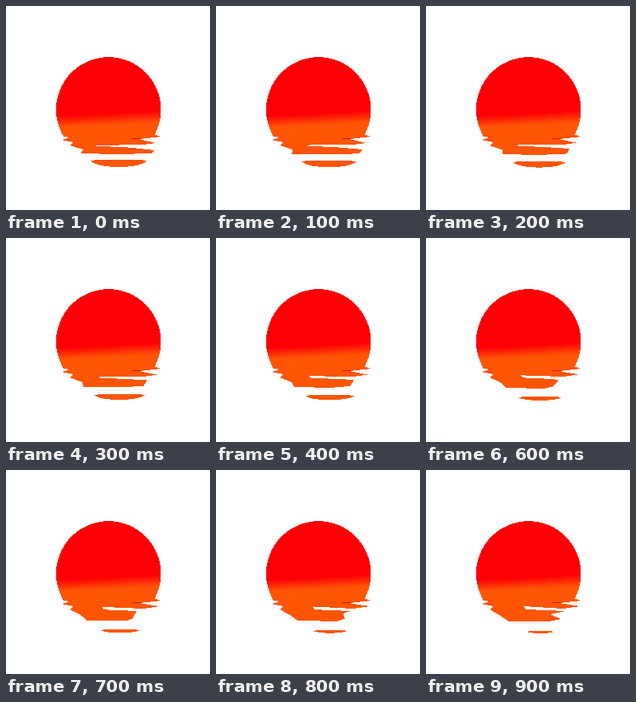
An HTML page for the animation above (1000 ms loop, 256 by 256 pixels).

```html
<!DOCTYPE html>
<html>
<head>
<meta charset="utf-8">
<style>
html, body { margin: 0; height: 100%; overflow: hidden; background: #fff; }
svg { display: block; width: 100%; height: 100%; }
</style>
</head>
<body>
<svg viewBox="0 0 256 256" shape-rendering="crispEdges">
  <defs>
    <linearGradient id="glow" gradientUnits="userSpaceOnUse" x1="128" y1="135" x2="128.7" y2="149">
      <stop offset="0" stop-color="#fd0006"/>
      <stop offset="1" stop-color="#ff5505"/>
    </linearGradient>
    <clipPath id="sky"><path d="M0 0H256V164H0Z"/></clipPath>
  </defs>
  <g fill="url(#glow)">
    <circle cx="128.7" cy="130" r="65.8" clip-path="url(#sky)"/>
    <path id="water"/>
    <path id="lens"/>
  </g>
  <path d="M158 166L169 167" stroke="#d01800"/>
</svg>
<script>
const water = document.getElementById('water');
const lens = document.getElementById('lens');
const mix = (a, b, k) => a + (b - a) * k;

// Sun edge in the water: the lower strip shrinks and sinks as p goes 0 to 1
function waterPath(p) {
  const at = (x0, y0, x1, y1) => [mix(x0, x1, p), mix(y0, y1, p)];
  const bend = Math.sin(Math.PI * p);
  const lag = Math.sin(Math.PI * p * p);
  const [cornerX, cornerY] = at(182, 185, 169, 187);
  const [tipX, tipY] = at(187, 181, 156, 181);
  const [slitX, slitY] = at(112, 175, 123, 171);
  const points = [
    [69, 163], [79, 165], [70, 168], [84, 171], [80, 175],
    at(97, 180, 92, 182),
    at(94, 185, 104, 190),
    at(140, 186, 154, 190),
    [cornerX - 14 * lag, cornerY],
    [tipX, tipY - 3 * bend],
    [mix(148, 175, p * p), 177],
    [slitX + 2, slitY + mix(1, 4, p)],
    [slitX, slitY],
    [172, 174],
    at(188, 172, 193, 171),
    [167, 167], [195, 164], [185, 161]
  ];
  return 'M' + points.join('L') + 'Z';
}

// Separate reflection below, narrowing faster near the end
function lensPath(p) {
  const late = p ** 4;
  const l = 106 + 12 * p + 8 * late;
  const r = 177 - 7 * p - 9 * late;
  const top = mix(193, 202, p);
  const bottom = mix(202, 205, p);
  const y = top + 1;
  const up = y + (top - y) / .75, down = y + (bottom - y) / .75;
  return `M${l} ${y}C${l + 4} ${up} ${r - 4} ${up} ${r} ${y}` +
    `C${r - 8} ${down} ${l + 8} ${down} ${l} ${y}Z`;
}

function draw() {
  const p = Math.floor(performance.now() % 1000 / 100) / 9;
  water.setAttribute('d', waterPath(p));
  lens.setAttribute('d', lensPath(p));
  requestAnimationFrame(draw);
}
draw();
</script>
</body>
</html>
```
